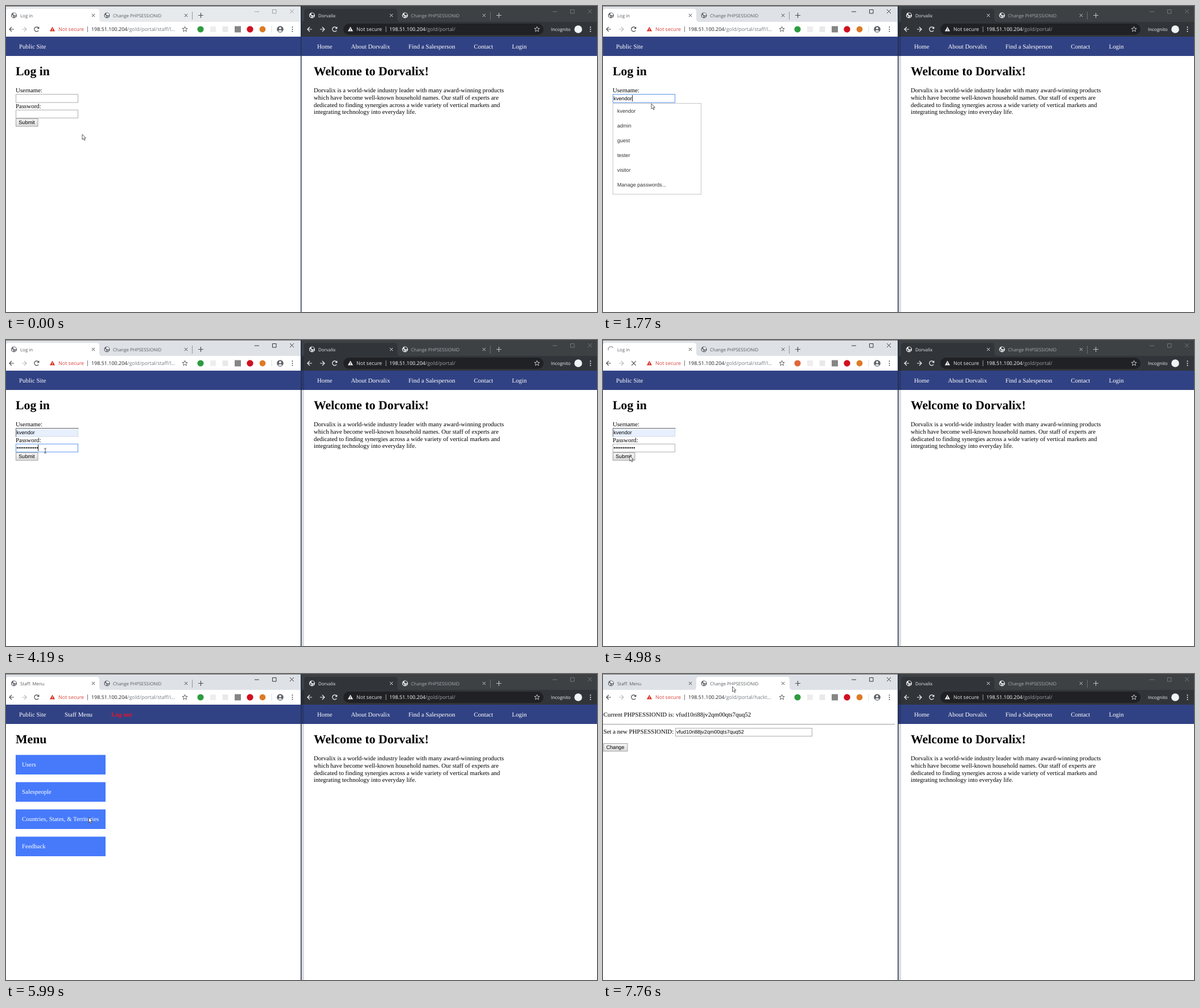
Recreate the animation shown at these times as an HTML page. Size 1039x539 px, loop 8000 ms.

```html
<!DOCTYPE html>
<html lang="en">
<head>
<meta charset="utf-8">
<title>Session demo</title>
<style>
  html, body { margin: 0; width: 100%; height: 100%; overflow: hidden; background: #fff; }
  svg { display: block; width: 1039px; height: 539px; text-rendering: geometricPrecision; }
  text { white-space: pre; }
  .tab { font: 7.95px "Open Sans", sans-serif; }
  .bar { font: 8.95px "Open Sans", sans-serif; }
  .page { font: 10.88px "Liberation Serif", serif; }
  .bold { font: bold 10.88px "Liberation Serif", serif; }
  .head { font: bold 21.8px "Liberation Serif", serif; }
  .field { font: 9.07px "Liberation Sans", sans-serif; }
</style>
</head>
<body>
<svg id="stage" viewBox="0 0 1039 539"></svg>
<script>
const LOOP = 8000;
const BRAND = 'Dorvalix', USER = 'kvendor', HOST = '198.51.100.204', PATH = '/gold/portal/';
const SESSION = 'vfud10ri88jv2qm00qts7quq52';
const NAVY = '#314284', INK = '#5f6368';
const stage = document.getElementById('stage');

// Drawing helpers: each returns an SVG string
const text = (x, y, str, cls = 'page', fill = '#000') =>
  `<text x="${x}" y="${y}" class="${cls}" fill="${fill}">${str.replace(/&/g, '&amp;')}</text>`;
const rect = (x, y, w, h, fill, more = '') =>
  `<rect x="${x}" y="${y}" width="${w}" height="${h}" fill="${fill}" ${more}/>`;
const disc = (x, y, r, fill) => `<circle cx="${x}" cy="${y}" r="${r}" fill="${fill}"/>`;
const line = (d, color, width = 1, more = '') =>
  `<path d="${d}" fill="none" stroke="${color}" stroke-width="${width}" ${more}/>`;
const shape = (d, fill, more = '') => `<path d="${d}" fill="${fill}" ${more}/>`;
const cross = (x, y, r, color, width = 1) =>
  line(`M${x - r} ${y - r}l${2 * r} ${2 * r}m0 ${-2 * r}l${-2 * r} ${2 * r}`, color, width);

const globe = (x, y, color, land) => disc(x, y, 5, color) +
  shape(`M${x - 4} ${y - 1.5}l3 2.6v2.6l-2-1.2zM${x - 1} ${y - 4}h3l1.8 2.2-1 2.2-2.2-.6-2-1zM${x + 1} ${y + 1.5}l2.4.4-2.2 2.2z`, land);

const tabShape = (x, w, fill) =>
  shape(`M${x - 5} 28q5 0 5-5V10q0-5 5-5h${w - 10}q5 0 5 5v13q0 5 5 5z`, fill);

function star(x, y, color) {
  const points = Array.from({ length: 10 }, (_, i) => {
    const a = i * Math.PI / 5 - Math.PI / 2, r = i % 2 ? 2.1 : 4.8;
    return `${(x + r * Math.cos(a)).toFixed(2)} ${(y + r * Math.sin(a)).toFixed(2)}`;
  });
  return line(`M${points.join('L')}z`, color, 0.9);
}

const arrow = (x, dir, color) =>
  line(`M${x - 4 * dir} 41h${8 * dir}m${-4 * dir} -4l${4 * dir} 4l${-4 * dir} 4`, color, 1.2);

const reload = (x, color) =>
  line(`M${x + 3.2} 43a4 4 0 1 1-.2-4.6`, color, 1.2) + shape(`M${x + 4.4} 36.2v4h-4z`, color);

const warning = (x, color, mark) =>
  shape(`M${x} 36.6l4.6 8h-9.2z`, color) + line(`M${x} 39.5v2.5m0 .7v1`, mark, 0.9);

const menuDots = (x, color) => [37.2, 41, 44.8].map(y => disc(x, y, 1, color)).join('');

const controls = (x, color, opacity) =>
  line(`M${x} 10h8M${x + 31.5} 6.5h6.5v6.5h-6.5zM${x + 62} 6l7 7m0-7l-7 7`, color, 0.9, `opacity="${opacity}"`);

function button(x, y, w, label, tx) {
  return rect(x + .5, y + .5, w - 1, 13.5, 'url(#btn)', 'stroke="#a0a0a0"') + text(tx, y + 10, label, 'field');
}

// kind: 'plain', 'focus', 'filled' or 'filledFocus'
function input(x, y, w, h, kind) {
  const filled = kind.startsWith('filled'), focus = /focus/i.test(kind);
  const out = rect(x + .5, y + .5, w - 1, h - 1, filled ? '#e8f0fe' : '#fff', `stroke="${focus ? '#5a93ee' : filled ? '#d4d8e0' : '#adadad'}"`);
  return out + (filled ? line(`M${x + .5} ${y + h}V${y + .5}h${w}`, focus ? '#54709f' : '#666') : '');
}

function rightWindow() {
  const nav = [[547, 'Home'], [606.5, `About ${BRAND}`], [707.5, 'Find a Salesperson'], [822.5, 'Contact'], [889.5, 'Login']];
  const copy = [
    `${BRAND} is a world-wide industry leader with many award-winning products`,
    'which have become well-known household names. Our staff of experts are',
    'dedicated to finding synergies across a wide variety of vertical markets and',
    'integrating technology into everyday life.'
  ];
  return rect(519, 0, 520, 539, '#fff') + rect(519, 0, 520, 29, '#3d4144') + rect(519, 28, 520, 26, '#313539') +
    tabShape(524, 164, '#313539') +
    globe(538, 16.5, '#f1f3f4', '#313539') + text(549, 19.6, BRAND, 'tab', '#e8eaed') + cross(677.5, 16.5, 2.6, '#e8eaed') +
    globe(701.5, 16.5, '#f1f3f4', '#3d4144') + text(712, 19.6, 'Change PHPSESSIONID', 'tab', '#a9adb1') + cross(840.5, 16.5, 2.6, '#c8cbce') +
    line('M851.5 10v14', '#6b6f73') + line('M862 16.5h9m-4.5-4.5v9', '#bdc1c6', 1.1) + controls(961, '#8d9195', .75) +
    arrow(534, -1, '#f1f3f4') + arrow(556, 1, '#f1f3f4') + reload(578, '#f1f3f4') +
    rect(593, 31, 352, 20, '#202124', 'rx="10"') + warning(605.5, '#f1f3f4', '#202124') +
    text(616, 44.2, 'Not secure', 'bar', '#e8eaed') + line('M668 36v10', '#9aa0a6') +
    `<text x="674" y="44.2" class="bar" fill="#fff">${HOST}<tspan fill="#9aa0a6">${PATH}</tspan></text>` +
    star(933.5, 41, '#d5d8db') + text(958, 43.9, 'Incognito', 'tab', '#f1f3f4') + disc(1006, 41, 6.8, '#f1f3f4') + menuDots(1027.5, '#f1f3f4') +
    rect(519, 54, 520, 34, NAVY) + nav.map(([x, s]) => text(x, 75, s, 'page', '#fff')).join('') +
    text(541, 122.3, `Welcome to ${BRAND}!`, 'head') +
    copy.map((s, i) => text(541, 152.4 + 12.55 * i, s)).join('');
}

const BACKDROP = `<defs><linearGradient id="btn" x2="0" y2="1"><stop stop-color="#f6f6f6"/><stop offset="1" stop-color="#dcdcdc"/></linearGradient></defs>` + rightWindow();

function leftChrome(t) {
  const active = t < 790 ? 0 : Math.min(1, (Math.floor((t - 790) / 125) + 1) / 3);
  const loading = t >= 4730 && t < 5990, second = t >= 7760, hover = t >= 7340 && !second;
  const title = t < 5710 ? 'Log in' : 'Staff: Menu';
  const rest = second ? 'hackt...' : t < 5710 ? 'staff/l...' : 'staff/i...';
  let out = rect(0, 0, 518, 29, '#e7eaed') + rect(0, 0, 518, 29, '#dee1e6', `opacity="${active}"`) + rect(0, 28, 518, 26, '#fff');
  if (hover) out += tabShape(164, 164, '#eceef1');
  out += second ? tabShape(164, 164, '#fff') : tabShape(0, 164, '#fff');

  if (loading) {
    const turn = t < 5710 ? -37 * Math.floor((t - 4730) / 137) : 0;
    out += line('M9.6 15a4.6 4.6 0 0 1 9 1.5', t < 5710 ? '#8a9098' : '#4a83e0', 1.3, `transform="rotate(${turn} 14 16.5)"`);
  } else out += globe(14, 16.5, INK, '#fff');

  out += text(25, 19.6, title, 'tab', '#5a5d61') + cross(153.5, 16.5, 2.6, '#3c4043') +
    globe(177.5, 16.5, INK, '#fff') + text(188, 19.6, 'Change PHPSESSIONID', 'tab', '#5a5d61') + cross(316.5, 16.5, 2.6, '#3c4043');
  if (t < 7500) out += line('M327.5 10v14', '#92969b');
  out += line('M338 16.5h9m-4.5-4.5v9', '#4a4d51', 1.2) + controls(437, '#222', .4 + .6 * active);

  out += arrow(10, -1, '#4a4d51') + arrow(32, 1, '#bbbdc0') + (loading ? cross(54, 41, 3.8, '#4a4d51', 1.2) : reload(54, '#4a4d51')) +
    warning(81.5, '#d93025', '#fff') + text(92, 44.2, 'Not secure', 'bar', '#d9433a') + line('M143.5 36v10', '#77797c') +
    `<text x="150" y="44.2" class="bar" fill="#202124">${HOST}<tspan fill="#777b80">${PATH}${rest}</tspan></text>` +
    star(314.5, 41, '#4a4d51') + disc(342, 41, 5.6, loading ? '#e0673a' : '#2e9b3f') +
    rect(359, 36, 10, 10, '#eeeeee') + rect(380.5, 36, 10, 10, '#e9e9e9') + rect(402, 35.5, 11, 11, '#858585') +
    disc(429, 41, 5.7, '#d01020') + disc(451, 41, 5.4, '#dd7a25') + line('M467 35v12', '#dadce0') +
    disc(482, 41, 5.8, INK) + disc(482, 39.2, 1.9, '#fff') + shape('M478.4 44q3.6-3 7.2 0q-3.6 3-7.2 0z', '#fff') + menuDots(503.5, '#4a4d51');
  return out + rect(0, 0, 519, 1, '#777') +
    rect(518, 0, 1.5, 539, '#24304f') + rect(519.5, 29, 4.5, 510, '#000', `opacity="${(.14 * active).toFixed(3)}"`);
}

function suggestions() {
  const rows = [USER, 'admin', 'guest', 'tester', 'visitor', 'Manage passwords...'];
  return rect(17.5, 171.5, 155, 160, '#fff', 'stroke="#c6c6c6"') +
    rows.map((s, i) => text(25, 188 + 26 * i, s, 'field', '#333')).join('');
}

function loginPage(t) {
  const userFocus = t >= 1180 && t < 2850, passFocus = t >= 2850 && t < 4730, typed = t >= 1620;
  const userKind = (t >= 1910 ? 'filled' : '') + (userFocus ? (t >= 1910 ? 'Focus' : 'focus') : '');
  const caret = (x, y) => line(`M${x} ${y}v11`, '#000', 0.9);
  let out = text(17, 122.3, 'Log in', 'head') + text(17, 152.4, 'Username:') + input(17, 155, 110, 15.5, userKind || 'plain') +
    text(17, 180.3, 'Password:') + input(17, 182.7, 110, 15, passFocus ? 'focus' : 'plain') + button(17, 198, 39.5, 'Submit', 22.3);
  if (typed) out += text(18.5, 165.5, USER, 'field');
  if (t >= 1910 && userFocus) out += line('M18.5 167.5' + 'l1 -1l1 1'.repeat(16), '#e04040', 0.6);
  if (userFocus && t < 2710) out += caret(typed ? 51.6 : 18.7, 157);
  if (t >= 3790) for (let i = 0; i < 12; i++) out += disc(20 + i * 3.18, 190, 1.15, '#000');
  if (passFocus && (t < 3380 || t >= 3790 && t < 4460)) out += caret(t < 3790 ? 18.6 : 56.6, 184.5);
  if (t >= 1180 && t < 1910) out += suggestions();
  return out;
}

function menuPage() {
  const items = ['Users', 'Salespeople', 'Countries, States, & Territories', 'Feedback'];
  return text(17, 122.3, 'Menu', 'head') + items.map((s, i) =>
    rect(17, 142.5 + 48 * i, 158, 34.5, '#467afb') + text(28, 163.4 + 48 * i, s, 'page', '#fff')).join('');
}

const sessionPage = () => text(.7, 74.6, `Current PHPSESSIONID is: ${SESSION}`) + rect(0, 88, 513, 1, '#9a9a9a') +
  text(.7, 105.4, 'Set a new PHPSESSIONID:') + input(127, 95, 241, 15, 'plain') + text(129, 105.4, SESSION, 'field') +
  button(.5, 122, 43, 'Change', 5.7);

function leftPage(t) {
  if (t >= 7760) return sessionPage();
  let nav = rect(0, 54, 518, 34, NAVY);
  if (t >= 7210 && t < 7340) nav += rect(175, 54, 57, 34, '#3d57ae');
  nav += text(23, 75, 'Public Site', 'page', '#fff');
  if (t < 5990) return nav + loginPage(t);
  return nav + text(103, 75, 'Staff Menu', 'page', '#fff') + text(185.3, 75, 'Log out', 'bold', '#ee1128') + menuPage();
}

// Pointer stops: time, x, y, shape (a = arrow, i = text beam, '' = hidden)
const STOPS = [
  [0, 134, 226, 'a'], [260, 121, 208, 'a'], [390, 105, 186, 'a'], [520, 90, 163, 'i'], [650, 86, 160, 'i'],
  [1620, 0, 0, ''], [1770, 85, 172, 'a'], [1910, 85, 179, 'a'],
  [2300, 85, 181, 'a'], [2425, 86, 187, 'i'], [2550, 86, 190, 'i'], [4190, 69, 195, 'i'],
  [4330, 62, 199, 'a'], [4460, 54, 202, 'a'], [4590, 47, 204, 'a'], [5140, 145.5, 252.5, 'a'],
  [6800, 146, 250, 'a'], [6940, 168, 200, 'a'], [7070, 213.5, 86.5, 'a'], [7210, 224, 62, 'a'], [7340, 227.5, 22, 'a']
];

function pointer(t) {
  const [, x, y, kind] = STOPS.findLast(s => s[0] <= t);
  if (kind === 'a') return shape('M0 0v9.2l2.1-1.9 1.6 3.4 1.5-.7-1.6-3.3h2.9z', '#fff', `stroke="#333" stroke-width=".8" transform="translate(${x} ${y})"`);
  return kind && line(`M${x - 2} ${y - 4}h4m-2 0v8m-2 0h4`, '#444', 0.9);
}

let start, shown = '';
function frame(now) {
  start ??= now;
  const t = (now - start) % LOOP;
  const scene = rect(0, 0, 518, 539, '#fff') + leftPage(t) + leftChrome(t) + pointer(t);
  if (scene !== shown) stage.innerHTML = BACKDROP + (shown = scene);
  requestAnimationFrame(frame);
}
requestAnimationFrame(frame);
</script>
</body>
</html>
```
